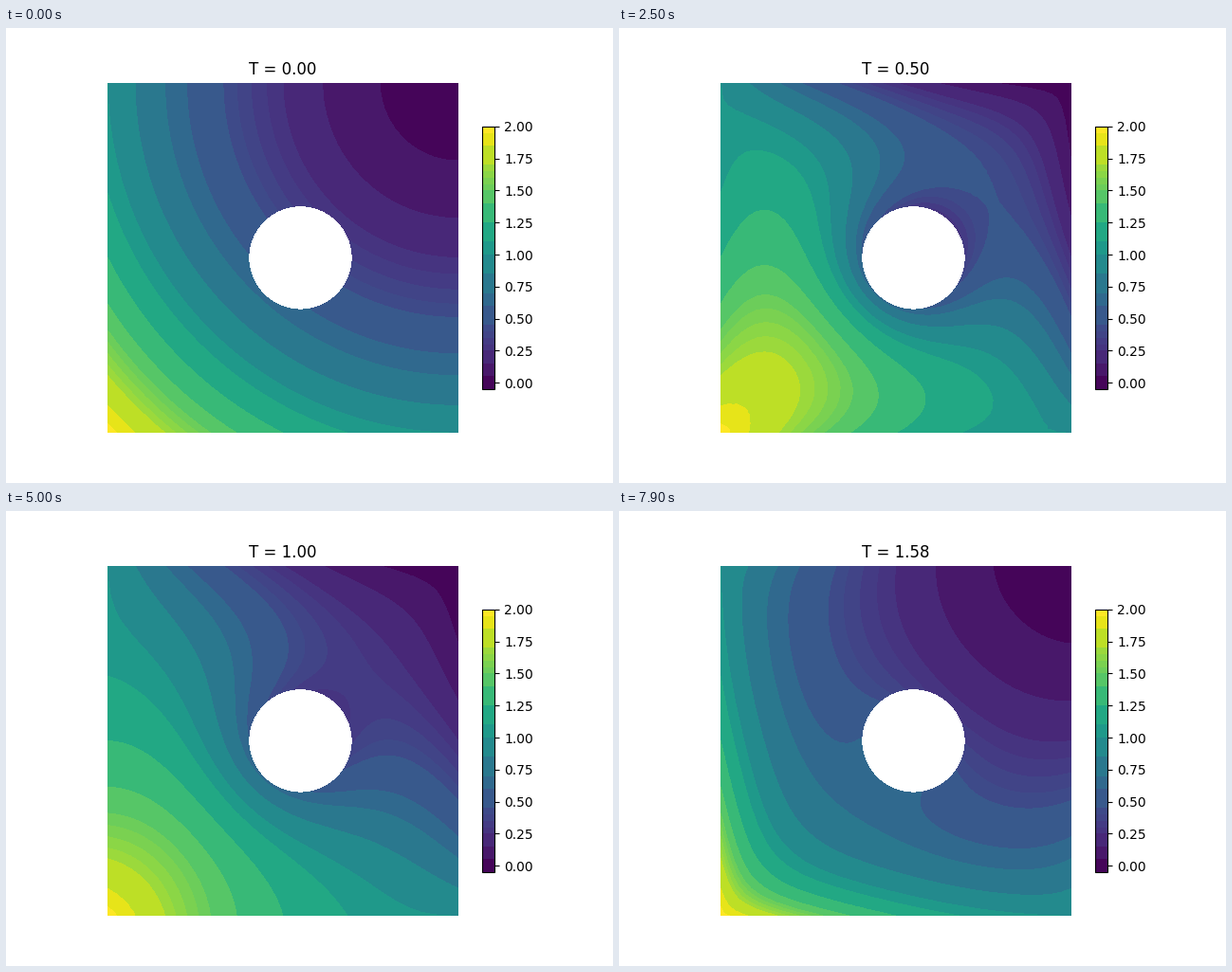
These frames come from a looping animation (640 by 480 pixels, 8 s). A matplotlib script:

```python
import numpy as np
import matplotlib.pyplot as plt
from matplotlib.animation import FuncAnimation
from matplotlib.colors import BoundaryNorm, ListedColormap
from matplotlib.tri import Triangulation

FRAMES, DT, SUBSTEPS = 80, 0.02, 4
SIDE, RINGS = 24, 20
CENTER, RADIUS = np.array([0.55, 0.5]), 0.148
DIFFUSION = 0.15
LEVELS = np.array([-0.05, 0.05, 0.15, 0.25, 0.3, 0.35, 0.4, 0.45, 0.6, 0.7,
                   0.85, 1.0, 1.1, 1.25, 1.4, 1.5, 1.55, 1.6, 1.65, 1.7,
                   1.85, 1.95, 2.0])


def build_mesh():
    """Ring mesh between the round hole and the unit square."""
    s = np.arange(SIDE) / SIDE
    one, zero = np.ones(SIDE), np.zeros(SIDE)
    outer = np.column_stack([np.concatenate([s, one, 1 - s, zero]),
                             np.concatenate([zero, s, one, 1 - s])])
    ray = outer - CENTER
    inner = CENTER + RADIUS * ray / np.linalg.norm(ray, axis=1)[:, None]
    blend = np.linspace(0, 1, RINGS + 1)[:, None, None]
    points = (inner + (outer - inner) * blend).reshape(-1, 2)

    n = 4 * SIDE
    ring, k = np.meshgrid(np.arange(RINGS), np.arange(n), indexing="ij")
    a = (ring * n + k).ravel()
    b = (ring * n + (k + 1) % n).ravel()
    tris = np.vstack([np.column_stack([a, a + n, b]),
                      np.column_stack([b, a + n, b + n])])
    return points, tris, slice(n, RINGS * n)


def assemble(points, tris):
    """Linear-element stiffness matrix and lumped mass."""
    p = points[tris]
    edge = np.roll(p, -2, axis=1) - np.roll(p, -1, axis=1)
    d1, d2 = p[:, 1] - p[:, 0], p[:, 2] - p[:, 0]
    area = np.abs(d1[:, 0] * d2[:, 1] - d1[:, 1] * d2[:, 0]) / 2
    count = len(points)
    stiff, mass = np.zeros((count, count)), np.zeros(count)
    for i in range(3):
        np.add.at(mass, tris[:, i], area / 3)
        for j in range(3):
            dot = (edge[:, i] * edge[:, j]).sum(axis=1)
            np.add.at(stiff, (tris[:, i], tris[:, j]), dot / (4 * area))
    return stiff, mass


def source(t, g):
    return 10 * (1 + np.cos(1.95 * t)) - 1.7 * (t**5 - 1) * g**2 - 4


def solve(points, tris, free):
    """Implicit heat steps with fixed values on both boundaries."""
    g = ((1 - points) ** 2).sum(axis=1)
    stiff, mass = assemble(points, tris)
    h = DT / SUBSTEPS
    m, k = mass[free], stiff[free, free]
    step = np.linalg.inv(np.diag(m) + h * DIFFUSION * k)
    edge_flux = stiff[free] @ g - k @ g[free]
    u, states = g.copy(), [g.copy()]
    for i in range(1, (FRAMES - 1) * SUBSTEPS + 1):
        load = m * source(i * h, g[free]) - edge_flux
        u[free] = step @ (m * u[free] + h * DIFFUSION * load)
        if i % SUBSTEPS == 0:
            states.append(np.clip(u, 0, 2))
    return states


points, tris, free = build_mesh()
states = solve(points, tris, free)
mesh = Triangulation(points[:, 0], points[:, 1], tris)

middles = (LEVELS[:-1] + LEVELS[1:]) / 2
cmap = ListedColormap(plt.get_cmap("viridis")((middles + 0.025) / 2))
norm = BoundaryNorm(LEVELS, cmap.N)

fig, ax = plt.subplots(figsize=(6.4, 4.8), dpi=100)
ax.set_aspect("equal")
ax.set_axis_off()
title = ax.set_title("T = 0.00")


def fill(u):
    bands = ax.tricontourf(mesh, u, levels=LEVELS, cmap=cmap, norm=norm)
    ax.set(xlim=(0, 1), ylim=(0, 1))
    return bands


current = [fill(states[0])]
bar = fig.colorbar(current[0], ax=ax, shrink=0.75, spacing="proportional",
                   ticks=np.linspace(0, 2, 9), format="%.2f")
bar.minorticks_off()


def draw(i):
    current[0].remove()
    current[0] = fill(states[i])
    title.set_text(f"T = {i * DT:.2f}")
    return current[0], title


anim = FuncAnimation(fig, draw, frames=FRAMES, interval=100,
                     init_func=lambda: [], repeat=True, repeat_delay=0)
plt.show()
```
